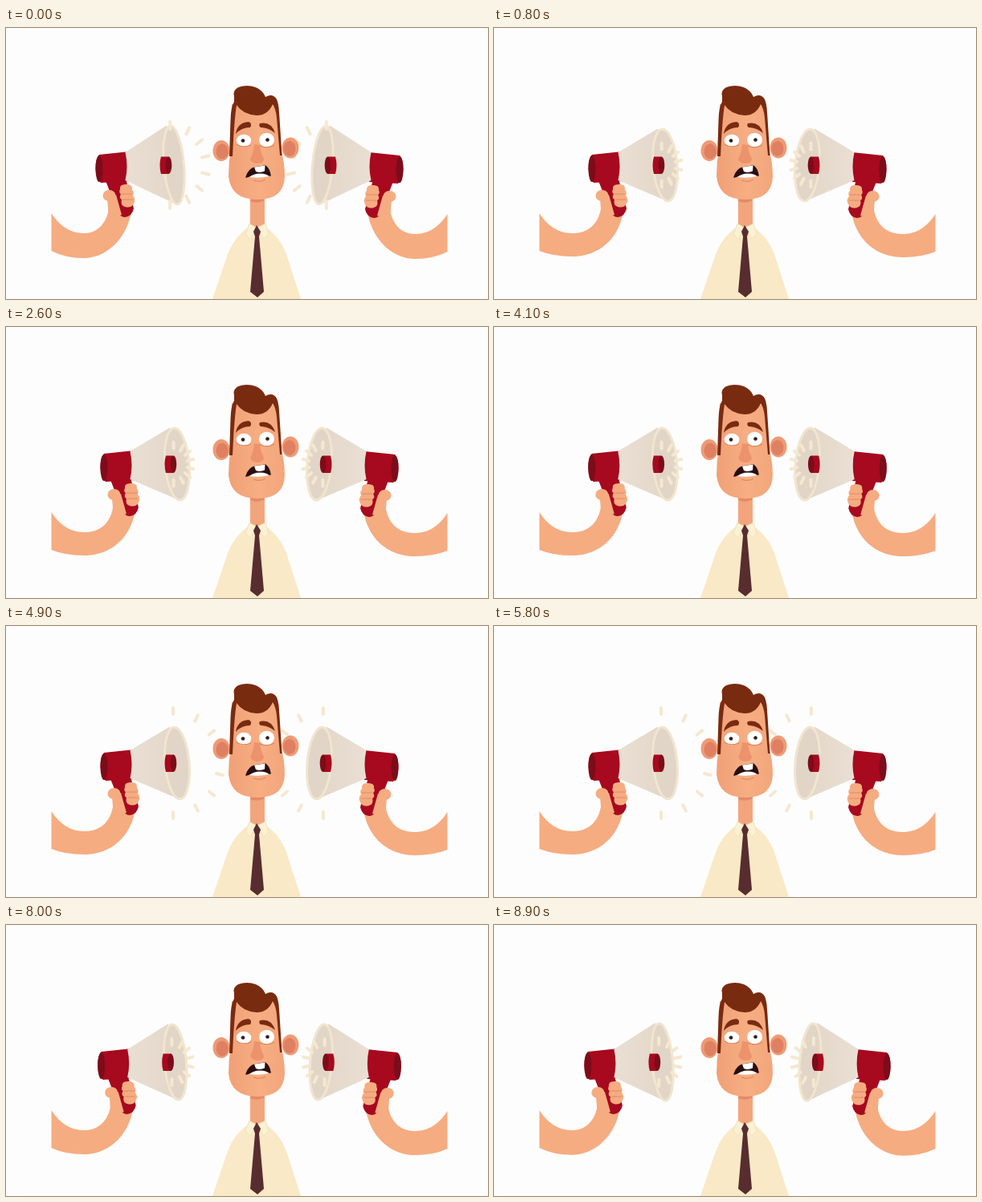
Recreate the animation shown at these times as an HTML page. Size 600 by 338 pixels, loop 9 s.

```html
<!DOCTYPE html>
<html lang="en">
<head>
<meta charset="utf-8">
<title>Two megaphones</title>
<style>
html, body { margin: 0; width: 100%; height: 100%; overflow: hidden; background: #fdfdfd; }
svg { display: block; width: 100%; height: 100%; }
.skin { fill: #f5ac81; }
.hair { fill: #792b10; }
.red { fill: #a7091e; }
.dark { fill: #7c0c19; }
.ear { fill: #ee9b75; }
.shade { fill: #df8062; }
</style>
</head>
<body>
<svg viewBox="0 0 600 338">
  <defs>
    <linearGradient id="face">
      <stop offset="0" stop-color="#f1a077"/>
      <stop offset=".55" stop-color="#f6ae82"/>
      <stop offset="1" stop-color="#f3a57b"/>
    </linearGradient>
    <linearGradient id="shell">
      <stop offset="0" stop-color="#e9dfd2"/>
      <stop offset="1" stop-color="#e2d6c8"/>
    </linearGradient>
  </defs>

  <g id="holder">
    <path id="arm" class="skin"/>
    <g id="grip">
      <path class="red" d="M129 188H155L165 225Q163 235 154 236Q148 236 145 229Z"/>
      <path class="red" d="M122 158L160 154V191L124 193Q118 189 117.500 176T122 158Z"/>
      <ellipse class="dark" cx="122" cy="175.500" rx="4.500" ry="16.500"/>
      <path class="skin" d="M148 201Q147 195 155 195Q164 194 163 202Q166 205 164 209Q168 213 165 219Q162 225 154 223Q148 221 150 214Q146 212 149 207Q146 205 148 201Z"/>
      <path d="M150 207H163M151 214H164" stroke="#df8a64" fill="none"/>
      <ellipse class="skin" cx="134.500" cy="209" rx="8" ry="7"/>
      <path class="skin" d="M132 213L143 208L150 233L134 238Z"/>
    </g>
  </g>
  <use href="#holder" transform="matrix(-1 0 0 1 606 1)"/>

  <g id="horn">
    <path id="cone" fill="url(#shell)"/>
    <ellipse id="rim" fill="#e1d5c7" stroke="#f1e5cf" stroke-width="3"/>
    <g id="core">
      <path class="red" d="M199 160.500H208.500V182H199Q196 171 199 160.500Z"/>
      <ellipse class="dark" cx="208.500" cy="171.200" rx="3.800" ry="10.800"/>
    </g>
    <path id="rays" stroke="#f5e8cf" stroke-width="4" stroke-linecap="round"/>
  </g>
  <use href="#horn" transform="matrix(-1 0 0 1 603 0)"/>

  <g id="man">
    <path d="M300 250Q284 261 276 282L257 338H367L349 282Q341 261 325 250Z" fill="#fae9c6"/>
    <path d="M304 200H322V246Q313 252 304 246Z" fill="#f2a57c"/>
    <path d="M304 208H322V215Q313 220 304 216Z" fill="#e58a66"/>
    <path d="M303 244L312 249L323 244L327 257L321 263L312 250L304 263L298 257Z" fill="#fdf1d3" stroke="#ecdcb6" stroke-width=".8"/>
    <path d="M312 246L317 254L315 260L321 329L313 336L304 329L310 260L308 254Z" fill="#572d2f"/>

    <ellipse class="ear" cx="268" cy="153" rx="10.500" ry="13"/>
    <ellipse class="ear" cx="354" cy="149.500" rx="10.500" ry="13"/>
    <ellipse class="shade" cx="269" cy="154" rx="7.500" ry="9.500"/>
    <ellipse class="shade" cx="353" cy="150.500" rx="7.500" ry="9.500"/>
    <path d="M281 95H338L342 150Q347 168 347 185Q346 214 313 214T277 185Q277 168 280 150Z" fill="url(#face)"/>
    <path class="hair" d="M278 160L279.500 115Q280 98 284 92V85Q282 78 289 74Q300 70 311 74Q320 78 323 86Q332 81 337 89Q339.500 95 340 105L343.500 159H341L337 112Q336 101 332 95Q326 109 312 109Q295 108 287 96Q284 115 282 160Z"/>

    <path class="hair" d="M286 132Q288 118 302 117Q307 119 304 124Q293 124 286 132Z"/>
    <path class="hair" d="M316 119Q330 116 335 131Q326 124 317 124Q314 122 316 119Z"/>
    <g fill="#fff">
      <ellipse cx="296" cy="140.500" rx="9.300" ry="7.800"/>
      <ellipse cx="324.500" cy="139.500" rx="9.500" ry="8.800"/>
    </g>
    <g fill="none" stroke="#d9805c">
      <path d="M287 145Q295 150 305 146M316 147Q325 151 334 146"/>
      <path d="M308 190Q316 193 323 189"/>
    </g>
    <g fill="#2b201e">
      <circle cx="295" cy="140.500" r="2.300"/>
      <circle cx="325.500" cy="139.500" r="2.300"/>
    </g>
    <path d="M309 145Q308 156 304 163Q305 168 312 169Q321 169 321 163Q317 156 316 146Z" fill="#ec936c"/>
    <path d="M299 186Q302 176 310 174L323 172Q328 176 329 184Q315 180 299 186Z" fill="#2a0e10" stroke="#2a0e10" stroke-width="1.500" stroke-linejoin="round"/>
    <path d="M309 173.500L322.500 171.500L322 178.500Q316 181 311 179Z" fill="#fff"/>
    <path d="M303 186Q308 181.500 316 181.500Q325 181.500 327 185Q315 188 303 186Z" fill="#fff"/>
  </g>
</svg>

<script>
const LOOP = 9000, STEP = 100;
const el = id => document.getElementById(id);
const set = (id, attrs) => {
  for (const key in attrs) el(id).setAttribute(key, attrs[key]);
};

// Offsets of the upper rays from the horn's centre; the lower ones mirror them.
const spokes = [[-1, 65], [28, 56], [47, 38], [57, 14]];

function rayPath(cx, spread, length) {
  let path = '';
  for (const [x, y] of spokes) for (const sign of [-1, 1]) {
    const half = length / 2 / Math.hypot(x, y);
    const point = k => `${cx + x * k} ${171 + sign * y * k}`;
    path += `M${point(spread - half)}L${point(spread + half)}`;
  }
  return path;
}

// back: 0 is closest to the head, 1 is fully drawn back.
function draw(back, spread, length) {
  const shift = -6 * back, rimX = 213 - 4 * back, rimH = 46.5 + 4 * back;
  const base = 154.5 + shift, arm = -5 * back, low = 285 + 2 * back;
  set('grip', { transform: `translate(${shift} 0)` });
  set('core', { transform: `translate(${shift} 0)` });
  set('rim', { cx: rimX, cy: 171, rx: 15 - 2.5 * back, ry: rimH - 1.5, transform: `rotate(-5 ${rimX} 171)` });
  set('cone', { d: `M${base} 155L${rimX - 9} ${172 - rimH}L${rimX + 5} ${170.5 + rimH}L${base} 190Q${base + 4} 173 ${base} 155Z` });
  set('arm', { d: `M56.5 231Q72 255 95 256C${121 + arm} 257 ${134 + arm} 240 ${134 + arm} 214L${160 + arm} 234C${152 + arm} 268 ${126 + arm} ${low} 97 ${low}Q74 ${low} 56.5 278Z` });
  set('rays', { d: rayPath(209 - 4 * back, spread, length) });
}

function frame(now) {
  const n = Math.floor(now % LOOP / STEP), beat = n % 3;
  if (beat === 0) draw(1, .76, 9);
  else if (beat === 1) draw(0, 1, 8);
  else {
    const drift = (n / 89) ** 4;
    draw(.85 * drift, .36 + .04 * drift, 8);
  }
  requestAnimationFrame(frame);
}
frame(0);
</script>
</body>
</html>
```
